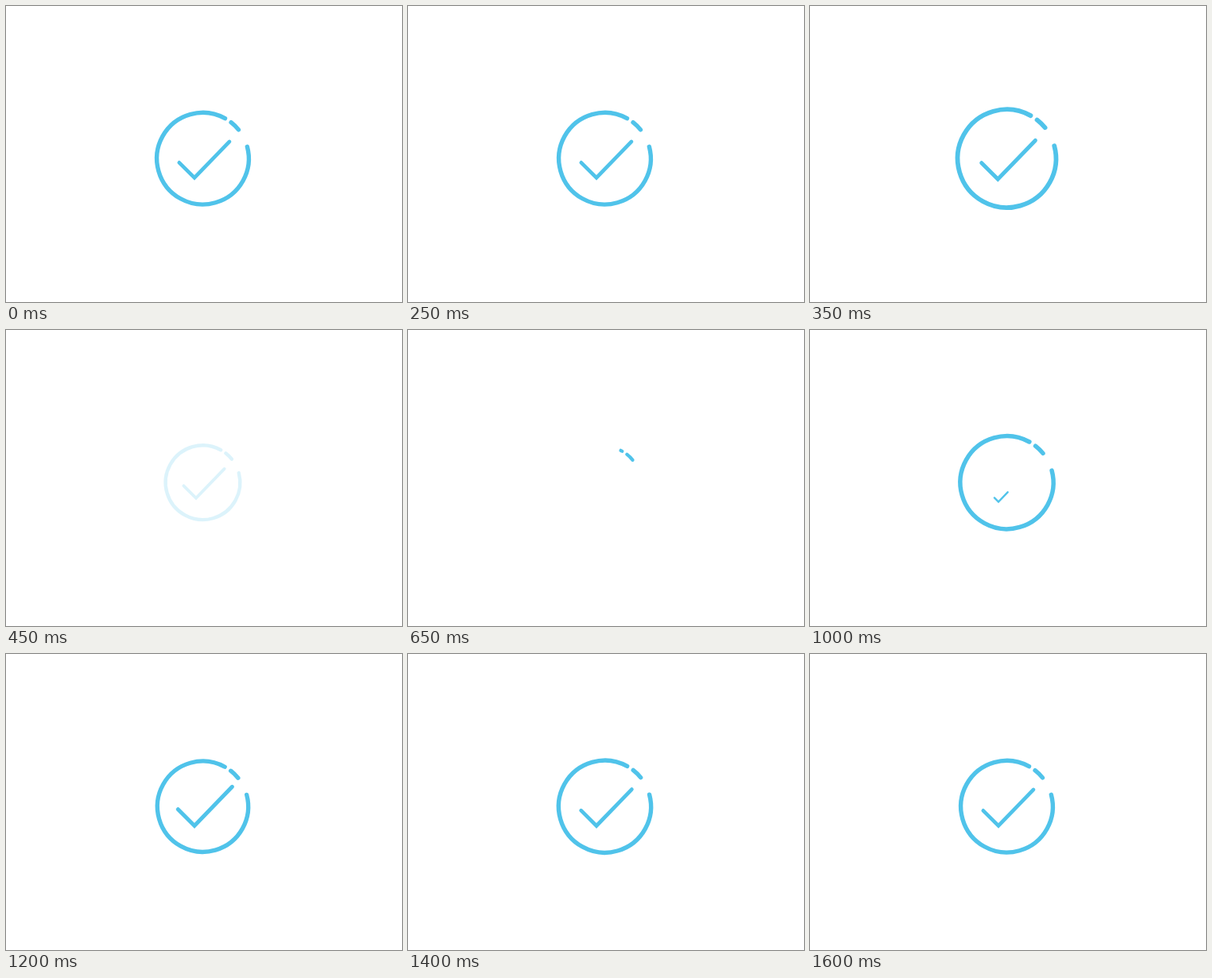
Write an HTML page with a canvas that moves like this. It is 498 px wide and 373 px high and loops after 1650 ms.

```html
<!DOCTYPE html>
<html lang="en">
<head>
<meta charset="utf-8">
<title>Check mark loop</title>
<style>
  html, body { margin: 0; width: 100%; height: 100%; overflow: hidden; background: #fff; }
  canvas { display: block; }
</style>
</head>
<body>
<canvas width="498" height="373"></canvas>
<script>
const ctx = document.querySelector('canvas').getContext('2d');
const LOOP = 1650, STEP = 50;
const CENTER = [247.5, 192.2], RADIUS = 57.8;

// Keys are [time, value]; values ease in and out between them.
const RING_SCALE = [[250, 1], [350, 1.07], [480, 0.77], [560, 0.78], [800, 0.78],
  [1050, 1.04], [1200, 0.988], [1350, 1.006], [1500, 1]];
const CHECK_SCALE = [[600, 1], [601, 0], [930, 0], [1150, 1.11], [1300, 0.985],
  [1420, 1.01], [1600, 1]];

function valueAt(keys, t) {
  const next = keys.findIndex(key => key[0] > t);
  if (next === 0) return keys[0][1];
  if (next < 0) return keys[keys.length - 1][1];
  const [t0, a] = keys[next - 1], [t1, b] = keys[next];
  const x = (t - t0) / (t1 - t0);
  return a + (b - a) * x * x * (3 - 2 * x);
}

const clamp = x => Math.min(1, Math.max(0, x));

// Strokes the part of an arc that the counterclockwise sweep has reached.
function drawArc(from, to, reached) {
  const end = Math.max(to, reached);
  if (end >= from) return;
  ctx.beginPath();
  ctx.arc(0, 0, RADIUS, from * Math.PI / 180, end * Math.PI / 180, true);
  ctx.stroke();
}

function drawRing(progress) {
  const reached = -39 - 336 * progress;
  ctx.lineWidth = 5.4;
  drawArc(-39, -52, reached);
  drawArc(-61, -375, reached);
}

function drawCheck(scale) {
  if (scale <= 0) return;
  ctx.lineWidth = Math.max(2.4, 4.7 * scale);
  ctx.beginPath();
  ctx.moveTo(-10.5 - 19.2 * scale, 24.3 - 19.2 * scale);
  ctx.lineTo(-10.5, 24.3);
  ctx.lineTo(-10.5 + 44 * scale, 24.3 - 45.6 * scale);
  ctx.stroke();
}

function draw(t) {
  const entering = t >= 550;
  ctx.clearRect(0, 0, 498, 373);
  ctx.save();
  ctx.translate(...CENTER);
  const scale = valueAt(RING_SCALE, t);
  // The check only follows the ring's scale on the way out.
  ctx.save();
  ctx.scale(scale, scale);
  ctx.strokeStyle = '#50c3ea';
  ctx.lineCap = 'round';
  ctx.globalAlpha = entering ? 1 : clamp((470 - t) / 100);
  drawRing(entering ? clamp((t - 570) / 410) ** 1.6 : 1);
  if (!entering) drawCheck(1);
  ctx.restore();
  if (entering && t > 600) {
    ctx.strokeStyle = '#50c3ea';
    ctx.lineCap = 'round';
    drawCheck(valueAt(CHECK_SCALE, t));
  }
  ctx.restore();
}

const start = performance.now();
function tick() {
  const t = (performance.now() - start) % LOOP;
  draw(Math.floor(t / STEP) * STEP);
  requestAnimationFrame(tick);
}
tick();
</script>
</body>
</html>
```
